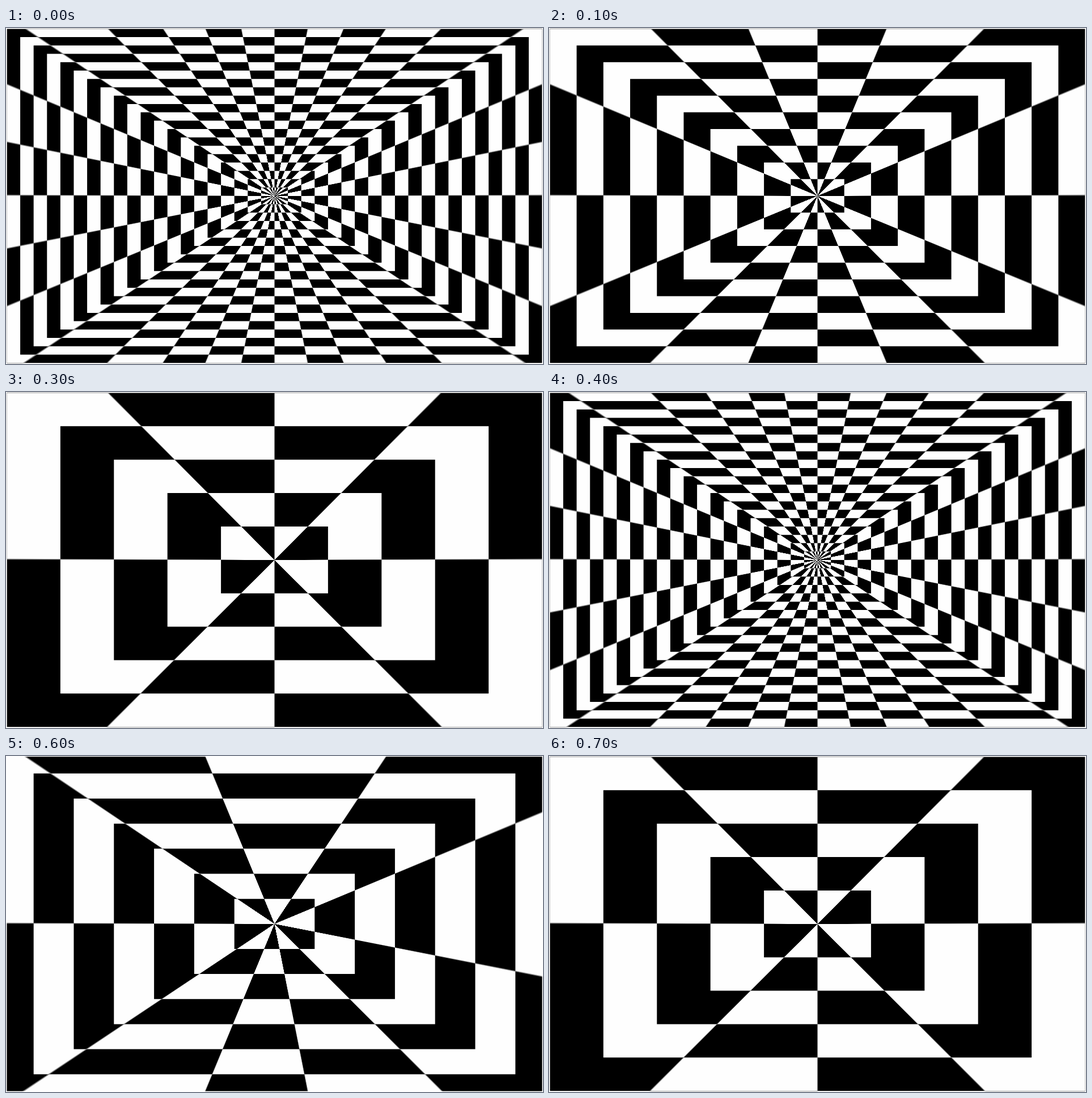
An HTML page without scripts that plays this animation: 947 px wide and 592 px high, repeating every 800 ms.

```html
<!DOCTYPE html>
<html lang="en">
<head>
<meta charset="utf-8">
<title>Checkered tunnel</title>
<style>
  html, body { margin: 0; width: 100%; height: 100%; overflow: hidden; background: #fefefe; }
  .stage {
    position: absolute;
    left: 0;
    top: 0;
    width: 947px;
    height: 592px;
    clip-path: inset(1.3px 1.5px 1.5px);
  }

  /* --k: how many base cells one cell spans */
  .view {
    position: absolute;
    inset: 0;
    overflow: hidden;
    background: #fefefe;
    isolation: isolate;
    visibility: hidden;
    animation: show 400ms step-end calc(var(--k) * 100ms - 500ms) infinite;
  }
  @keyframes show {
    0% { visibility: visible; }
    25%, 100% { visibility: hidden; }
  }

  /* Both halves lean up slightly towards the sides */
  .fan {
    --cell: calc(var(--k) * 11.25deg);
    --soft: .35deg;
    position: absolute;
    top: -10px;
    height: 612px;
    background: repeating-conic-gradient(from calc(var(--soft) / 2) at var(--x) 305.8px,
      #000 0 calc(var(--cell) - var(--soft)),
      #fefefe var(--cell) calc(2 * var(--cell) - var(--soft)),
      #000 calc(2 * var(--cell)));
    transform-origin: var(--x) 305.8px;
    mix-blend-mode: difference;
  }
  .left { --x: 473.5px; left: 0; width: 474px; transform: skewY(.15deg); }
  .right { --x: -.5px; left: 474px; width: 473px; transform: skewY(-.15deg); }

  .rings {
    position: absolute;
    left: 0;
    top: 0;
    width: 947px;
    height: 592px;
    mix-blend-mode: difference;
    filter: blur(.4px);
  }
  #rings { fill: none; stroke: #fefefe; stroke-width: 1; }
</style>
</head>
<body>
<svg width="0" height="0" style="position:absolute">
  <defs>
    <path id="rings" d="M-1.5-1.5h3v3h-3z M-3.5-3.5h7v7h-7z M-5.5-5.5h11v11h-11z
      M-7.5-7.5h15v15h-15z M-9.5-9.5h19v19h-19z M-11.5-11.5h23v23h-23z
      M-13.5-13.5h27v27h-27z M-15.5-15.5h31v31h-31z M-17.5-17.5h35v35h-35z
      M-19.5-19.5h39v39h-39z"/>
  </defs>
</svg>

<div class="stage">
  <div class="view" style="--k:1">
    <div class="fan left"></div>
    <div class="fan right"></div>
    <svg class="rings" viewBox="-473.5 -295.8 947 592"><use href="#rings" transform="scale(23.6 14.72)"/></svg>
  </div>
  <div class="view" style="--k:2">
    <div class="fan left"></div>
    <div class="fan right"></div>
    <svg class="rings" viewBox="-473.5 -295.8 947 592"><use href="#rings" transform="scale(47.2 29.44)"/></svg>
  </div>
  <div class="view" style="--k:3">
    <div class="fan left"></div>
    <div class="fan right"></div>
    <svg class="rings" viewBox="-473.5 -295.8 947 592"><use href="#rings" transform="scale(70.8 44.16)"/></svg>
  </div>
  <div class="view" style="--k:4">
    <div class="fan left"></div>
    <div class="fan right"></div>
    <svg class="rings" viewBox="-473.5 -295.8 947 592"><use href="#rings" transform="scale(94.4 58.88)"/></svg>
  </div>
</div>
</body>
</html>
```
